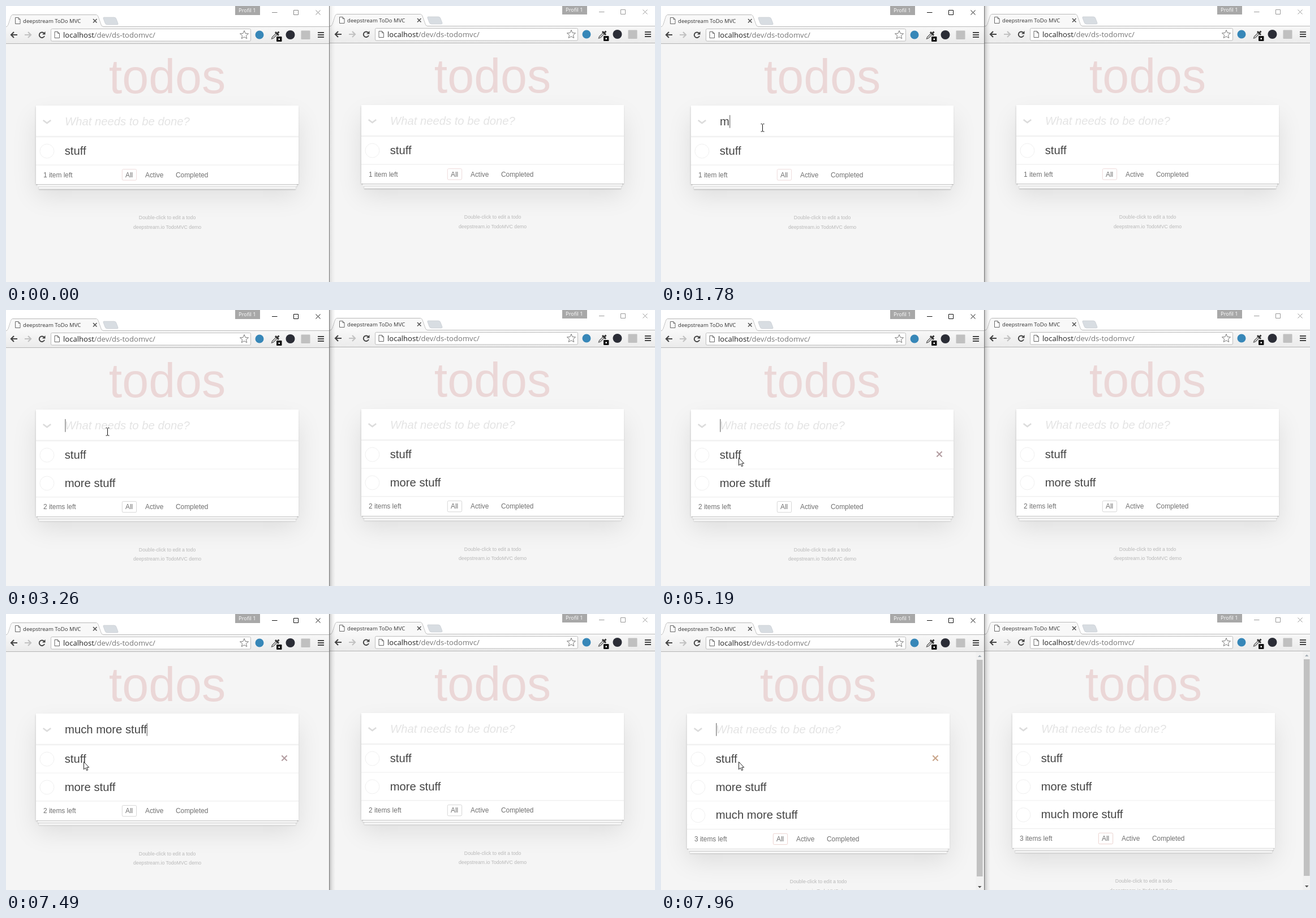
An HTML page for the animation above (8000 ms loop, 1147 px wide and 488 px high).

```html
<!DOCTYPE html>
<html lang="en">
<head>
<meta charset="utf-8">
<title>Synchronised todo lists</title>
<style>
html, body { margin: 0; width: 100%; height: 100%; overflow: hidden; background: #f5f5f5; }
.win { position: absolute; left: 0; top: 0; }
.win > svg, #overlay { position: absolute; left: 0; top: 0; overflow: visible; }
svg text { font-family: "Open Sans", "Noto Sans", sans-serif; white-space: pre; }
.app {
  position: absolute; top: 176px; width: 550px; transform-origin: 0 0; transform: scale(.8438);
  font: 24px/28px "Liberation Sans", Arial, sans-serif; color: #444;
}
h1 {
  position: absolute; top: -117.5px; width: 550px; margin: 0; text-align: center;
  font-size: 100px; font-weight: 400; line-height: 112px; color: #ebd7d7;
}
.card {
  position: relative; z-index: 0; isolation: isolate; background: #fff;
  box-shadow: 0 2px 4px rgba(0,0,0,.2), 0 25px 50px rgba(0,0,0,.1);
}
.entry {
  box-sizing: border-box; height: 65px; padding: 16px 0 0 60.5px; line-height: 33.6px;
  white-space: pre; box-shadow: inset 0 -2px 1px rgba(0,0,0,.03);
}
.hint { font-style: italic; color: #e4e4e4; }
.caret {
  display: inline-block; width: 1.2px; height: 27px; margin-right: -1.2px;
  vertical-align: -5.5px; background: #333;
}
ul { margin: 0; padding: 0; list-style: none; border-top: 1px solid #e6e6e6; }
li { position: relative; height: 43px; padding: 15px 0 0 60px; }
li + li { border-top: 1px solid #ededed; }
.icon { position: absolute; left: 0; top: 0; width: 550px; height: 65px; overflow: visible; fill: none; }
.foot {
  position: relative; height: 40px; border-top: 1px solid #e6e6e6;
  font-size: 14.1px; line-height: 40px; color: #707070;
}
.foot::before {
  content: ""; position: absolute; left: 0; right: 0; bottom: 0; height: 50px; z-index: -1;
  box-shadow: 0 1px 1px rgba(0,0,0,.2), 0 8px 0 -3px #f6f6f6, 0 9px 1px -3px rgba(0,0,0,.2),
    0 16px 0 -6px #f6f6f6, 0 17px 2px -6px rgba(0,0,0,.2);
}
.foot span { position: absolute; top: 0; white-space: pre; }
.foot b { position: absolute; left: 180px; top: 8px; width: 29px; height: 22px; border: 1px solid; border-radius: 3px; }
.info { padding-top: 60px; text-align: center; font-size: 10.35px; line-height: 20px; color: #b9b9b9; }
</style>
</head>
<body>
<script>
const LOOP = 8000;
const ITEMS = ["stuff", "more stuff", "much more stuff"];
const HINT = "What needs to be done?";
const FILTER_EDGE = ["#ebd5d5", "#cfcfcf", "#e8cac6"];

const line = (d, color, width) => `<path d="${d}" fill="none" stroke="${color}" stroke-width="${width}"/>`;

const sheet = (x, y) => `<path d="M${x} ${y}h5.5l3 3v8h-8.5zM${x + 5.5} ${y}v3h3" fill="#fff" stroke="#666"/>`;

function toolbarIcons() {
  return `
    <path d="M421 43.5l2.1 5 5.4.4-4.1 3.5 1.3 5.2-4.7-2.8-4.7 2.8 1.3-5.2-4.1-3.5 5.4-.4z" fill="#fff" stroke="#777"/>
    <circle cx="448" cy="51" r="7.5" fill="#3787b8"/>
    ${line("M469.5 58l1-3 7-7 2 2-7 7z", "#555", 1.2)}
    ${line("M476 46l6 6M479 49l3.5-3.5", "#333", 3)}
    <rect x="478" y="54" width="9.5" height="9" rx="1" fill="#111"/>
    <rect x="481.5" y="57.5" width="2.5" height="2.5" fill="#fff"/>
    <circle cx="502.5" cy="51" r="8" fill="#2b2d36"/>
    <rect x="521.5" y="43.5" width="16" height="15.5" rx="1" fill="#c0c0c0"/>
    ${line("M551 47h11M551 51h11M551 55h11", "#444", 2)}`;
}

function chrome(width) {
  const shift = width - 571;
  return `<svg width="${width}" height="489">
    <rect x="-2" width="${width + 2}" height="67" fill="#fff"/>
    <rect x="-2" y="36" width="${width + 2}" height="30.5" fill="url(#bar)"/>
    ${line(`M-2 36.5H1Q3 36 4 33L8.5 19Q9.5 15.5 12 15.5H159Q162 15.5 163 19L168 33Q169 36.5 172 36.5H${width}`, "#b9b9b9", 1)}
    <path d="M1 37Q3 36 4.5 33L9 19Q10 16 12 16H159Q161.5 16 162.5 19L167.5 33Q168.5 37 172 37z" fill="#f8f8f8"/>
    <path d="M173 20h18q3 0 4 3l3 8q.5 2-2 2h-17q-3 0-4-3l-3-8q-.5-2 1-2z" fill="#d8dde2" stroke="#c6cbd0" stroke-width=".7"/>
    ${sheet(16.5, 20.5)}
    <text x="30" y="29.5" font-size="9.6" fill="#333">deepstream ToDo MVC</text>
    ${line("M154 23l6.5 6.5M160.5 23l-6.5 6.5", "#555", 1.6)}
    ${line("M20 51H9.5M14 46l-5 5 5 5", "#444", 2.2)}
    ${line("M33 51H43.5M39 46l5 5-5 5", "#c2c2c2", 2.2)}
    ${line("M67.5 48.5A4.8 4.8 0 1 0 68 53", "#444", 2)}
    <path d="M69.5 45v5.5H64z" fill="#444"/>
    <rect x="79.5" y="40.5" width="${353 + shift}" height="21.5" rx="2" fill="#fff" stroke="#bdbdbd"/>
    ${sheet(86, 45.5)}
    <text x="101" y="55.5" font-size="13.08" fill="#222">localhost<tspan fill="#777">/dev/ds-todomvc/</tspan></text>
    <g transform="translate(${shift})">
      ${toolbarIcons()}
      <rect x="405" y="0" width="44" height="16" fill="#a8a8a8"/>
      <text x="411" y="11" font-size="9.4" fill="#fff">Profil 1</text>
      <path class="controls" d="M470 11.5h9.5M508.5 7.5h8v8h-8zM547.5 7.5l8 8M555.5 7.5l-8 8" fill="none" stroke="#999"/>
    </g>
    ${line(`M-2 66.5H${width}`, "#b4b4b4", 1)}
    <g class="scroll">
      <rect x="${556.5 + shift}" y="67" width="14.5" height="422" fill="#f1f1f1"/>
      <rect x="${558 + shift}" y="81" width="10.5" height="383" fill="#c1c1c1"/>
      <path d="M${560 + shift} 76h6.5l-3.25-3.5z" fill="#a3adb5"/>
      <path d="M${560 + shift} 481h6.5l-3.25 3.5z" fill="#505050"/>
    </g>
  </svg>`;
}

function page() {
  const row = text => `<li><svg class="icon"><circle cx="23" cy="29.5" r="14.8" stroke="#ededed"/>
    <path class="remove" d="M514.7 22l11 11M525.7 22l-11 11" stroke-width="2.5"/></svg>${text}</li>`;
  return `<div class="app">
    <h1>todos</h1>
    <div class="card">
      <svg class="icon"><path d="M15 30.8l8 6 8-6" stroke="#dcdcdc" stroke-width="3.2"/></svg>
      <div class="entry"><span class="typed"></span><i class="caret"></i><span class="hint">${HINT}</span></div>
      <ul>${ITEMS.map(row).join("")}</ul>
      <div class="foot">
        <span class="count" style="left:15.4px"></span><b></b>
        <span style="left:187.3px">All</span><span style="left:228.7px">Active</span>
        <span style="left:292.7px">Completed</span>
      </div>
    </div>
    <div class="info">Double-click to edit a todo<br>deepstream.io TodoMVC demo</div>
  </div>`;
}

function makeWindow(x, y, width, cardX) {
  const el = document.createElement("div");
  el.className = "win";
  el.style.cssText = `left:${x}px;top:${y}px;width:${width}px;height:489px`;
  el.innerHTML = chrome(width) + page();
  document.body.append(el);
  const find = name => el.querySelector(name);
  return {
    cardX, app: find(".app"), controls: find(".controls"), scroll: find(".scroll"), typed: find(".typed"),
    caret: find(".caret"), hint: find(".hint"), count: find(".count"), filter: find(".foot b"),
    rows: [...el.querySelectorAll("li")], removers: [...el.querySelectorAll(".remove")]
  };
}

document.body.insertAdjacentHTML("beforeend", `<svg width="0" height="0" style="position:absolute"><defs>
  <linearGradient id="bar" x2="0" y2="1"><stop stop-color="#f8f8f8"/><stop offset="1" stop-color="#ebebeb"/></linearGradient>
  <linearGradient id="shade"><stop stop-opacity=".22"/><stop offset=".4" stop-opacity=".08"/><stop offset="1" stop-opacity="0"/></linearGradient>
</defs></svg>`);
const right = makeWindow(573, -1, 576, 55);
const left = makeWindow(0, 0, 571, 53);
document.body.insertAdjacentHTML("beforeend", `<svg id="overlay" width="1147" height="488">
  <rect x="571" width="1" height="488" fill="#777"/>
  <rect id="shadow" x="572" width="10" height="488" fill="url(#shade)"/>
  <path id="arrow" d="M.5.5V13.8L3.5 11 5.6 15.6 7.7 14.7 5.7 10.2H9.7Z" fill="#fff" stroke="#222"/>
  <path id="beam" d="M-2.5-6.5H-.5L.5-5.5 1.5-6.5H3.5M.5-5.5V6M-2.5 7H-.5L.5 6 1.5 7H3.5" fill="none" stroke="#111"/>
</svg>`);
const [shadow, arrow, beam] = ["shadow", "arrow", "beam"].map(id => document.getElementById(id));

const show = (el, on) => { el.style.display = on ? "" : "none"; };
const within = (t, from, to) => t >= from && t < to;

function typedText(t) {
  if (within(t, 1780, 3180)) {
    return ITEMS[1].slice(0, t < 1860 ? 1 : 2 + Math.floor((t - 1860) / 117.5));
  }
  if (within(t, 5650, 6800)) return ITEMS[2].slice(0, Math.min(8, 1 + Math.floor((t - 5650) / 142.8)));
  if (within(t, 6800, 7880)) {
    const step = Math.floor((t - 6800) / 138);
    return ITEMS[2].slice(0, step < 5 ? 9 + step : 15);
  }
  return "";
}

function pointerAt(t) {
  if (t < 250) return null;
  if (t < 4120) {
    const p = Math.min(1, Math.floor((t - 250) / 85) / 8);
    const rest = (1 - p) ** 1.6;
    return { x: 179 + 529 * rest, y: 215 + 260 * rest };
  }
  if (t < 4235) return { x: 170, y: 224 };
  if (t < 4350) return { x: 145, y: 249 };
  return { x: 137, y: 261 };
}

function drawList(win, count) {
  win.rows.forEach((row, i) => show(row, i < count));
  show(win.scroll, count === 3);
  win.app.style.left = win.cardX - (count === 3 ? 7 : 0) + "px";
  win.count.textContent = `${count} item${count > 1 ? "s" : ""} left`;
  win.filter.style.borderColor = FILTER_EDGE[count - 1];
}

function drawPointer(pos) {
  const overEntry = pos && pos.x > 53 && pos.x < 517 && pos.y > 176 && pos.y < 231;
  show(arrow, pos && !overEntry);
  show(beam, overEntry);
  if (pos) (overEntry ? beam : arrow).setAttribute("transform", `translate(${Math.round(pos.x)} ${Math.round(pos.y)})`);
}

function render(t) {
  const count = t < 3180 ? 1 : t < 7880 ? 2 : 3;
  drawList(left, count);
  drawList(right, t < 3260 ? 1 : t < 7960 ? 2 : 3);

  const text = typedText(t);
  left.typed.textContent = text;
  show(left.hint, !text);
  const caretOn = within(t, 950, 1480) || within(t, 1780, 3790) || within(t, 4235, 4730) || t >= 5190;
  left.caret.style.opacity = caretOn ? 1 : 0;
  right.caret.style.opacity = 0;

  const focused = t >= 950;
  left.controls.setAttribute("stroke", focused ? "#111" : "#888");
  shadow.setAttribute("opacity", focused ? 1 : .5);
  left.removers[0].setAttribute("stroke", count === 3 ? "#c9a58a" : "#b39da1");
  [...left.removers, ...right.removers].forEach(el => show(el, el === left.removers[0] && t >= 4235));
  drawPointer(pointerAt(t));
}

const start = performance.now();
function tick() {
  render((performance.now() - start) % LOOP);
  requestAnimationFrame(tick);
}
tick();
</script>
</body>
</html>
```
